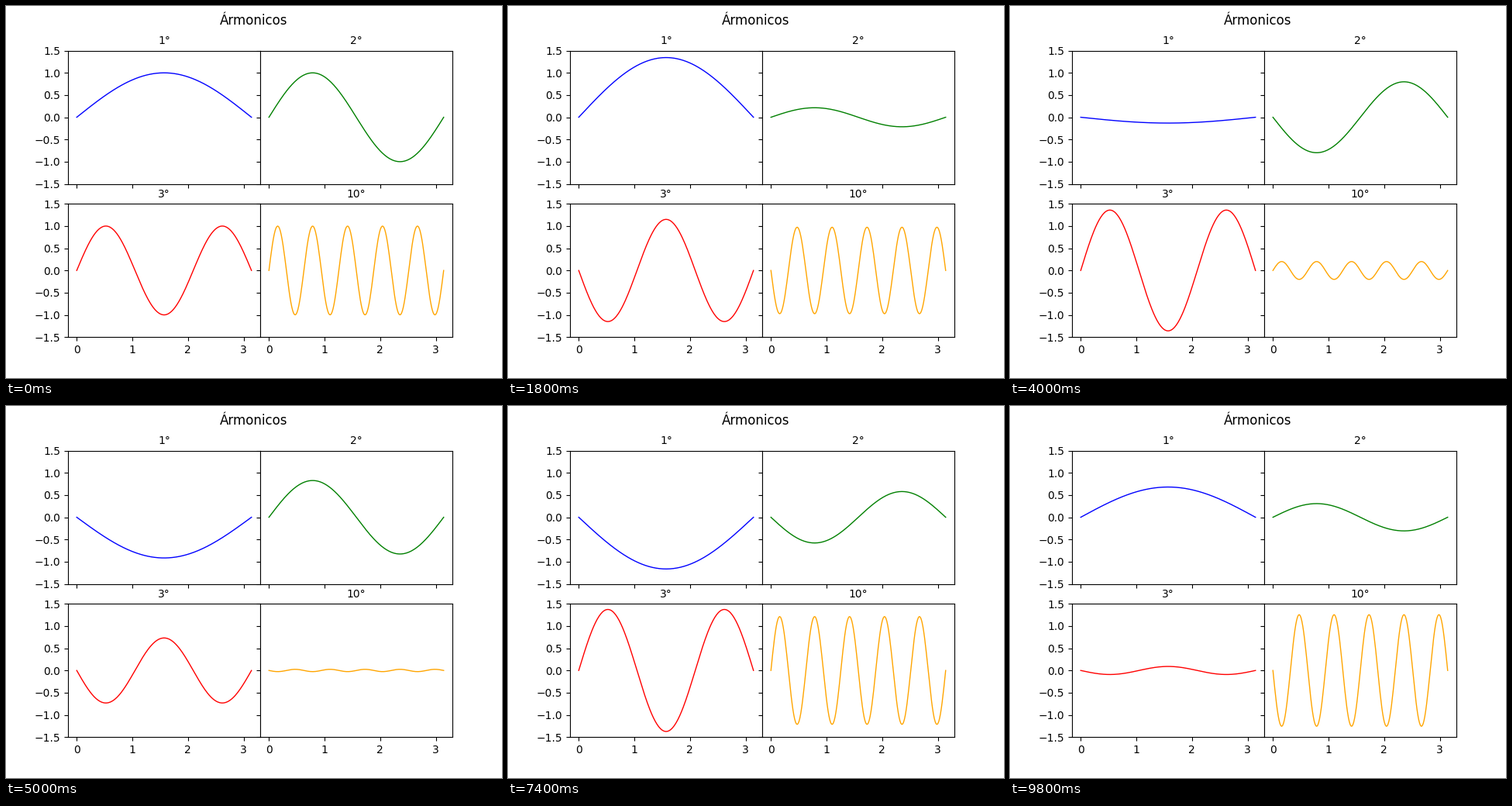
Write a matplotlib script that moves like this. It is 640 px wide and 480 px high and loops after 10000 ms.

```python
import numpy as np
import matplotlib.pyplot as plt
from matplotlib.animation import FuncAnimation

FRAMES = 50
INTERVAL = 200
MODES = [(1, "blue"), (2, "green"), (3, "red"), (10, "orange")]

plt.rcParams["font.family"] = "DejaVu Sans"

x = np.linspace(0, np.pi, 200)
times = np.linspace(0, 6, FRAMES)


def wave(n, t):
    """Standing wave of the n-th harmonic at time t."""
    return np.sin(n * x) * (np.cos(n * t) + np.sin(n * t))


fig, axes = plt.subplots(
    2, 2, sharex="col", sharey="row", figsize=(6.4, 4.8), dpi=100,
    gridspec_kw={"hspace": 0.15, "wspace": 0},
)
fig.suptitle("Ármonicos", fontsize=12)

lines = []
for ax, (n, color) in zip(axes.flat, MODES):
    line, = ax.plot(x, wave(n, 0), color=color, linewidth=1)
    ax.set_title(f"{n}°", fontsize=10)
    ax.set_ylim(-1.5, 1.5)
    lines.append(line)


def update(frame):
    for line, (n, _) in zip(lines, MODES):
        line.set_ydata(wave(n, times[frame]))
    return lines


anim = FuncAnimation(fig, update, frames=FRAMES, interval=INTERVAL,
                     init_func=lambda: update(0), repeat=True, repeat_delay=0)
plt.show()
```
